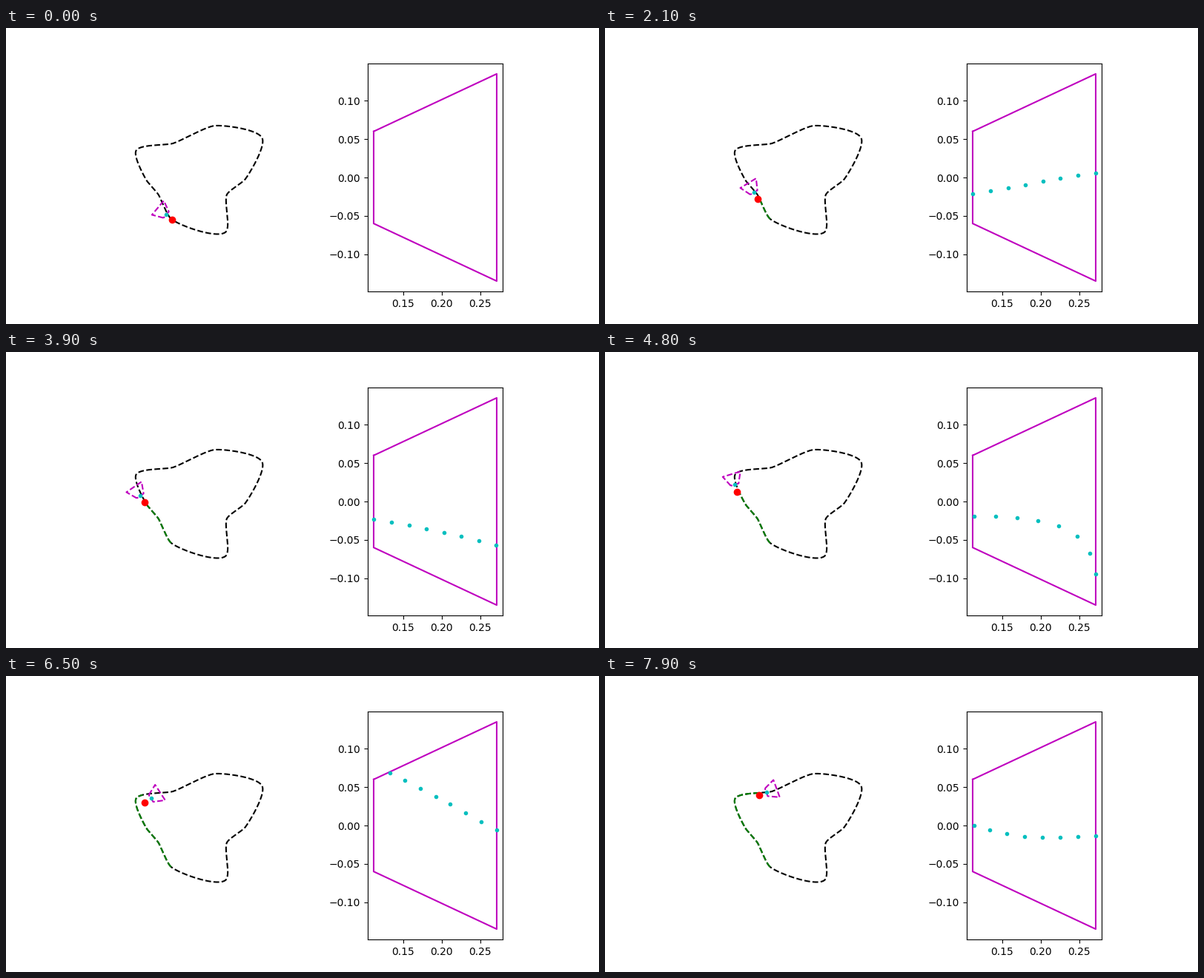
Animation, 800 px wide and 400 px high, one loop 8000 ms. Source, as a matplotlib script:

```python
import numpy as np
import matplotlib.pyplot as plt
from matplotlib.animation import FuncAnimation

W, H, DPI = 800, 400, 100
FRAMES, INTERVAL = 80, 100
SCALE = 92                      # pixels per metre on the map
NEAR, FAR = 0.1115, 0.2715      # camera view, metres ahead of the robot
HALF_NEAR, HALF_FAR = 0.06, 0.135

CORNERS = np.array([
    (223, 258.2), (205.5, 225), (189, 205), (175.6, 165.5), (225, 156),
    (282, 132), (345.5, 148.5), (323, 204), (298, 225), (296, 276)])

# time (s), x, y, heading (degrees)
POSES = np.array([
    (0.0, 224.0, 259.0, 140), (0.35, 222.2, 256.8, 133),
    (0.7, 219.8, 252.8, 122), (1.4, 213.1, 241.9, 120.5),
    (2.1, 206.2, 231.0, 121.4), (2.6, 201.3, 223.3, 125),
    (3.0, 197.0, 217.0, 125), (3.7, 189.3, 206.2, 124.5),
    (4.4, 181.2, 194.6, 122), (4.8, 178.0, 189.0, 107),
    (5.1, 177.5, 185.4, 85), (5.45, 178.8, 180.8, 63),
    (5.95, 182.2, 175.9, 50), (6.5, 187.0, 171.0, 33),
    (7.2, 197.0, 165.2, 24), (7.9, 208.0, 160.7, 20)])


def smooth_loop(pts, rad=0.2, count=100):
    """Closed Bezier curve whose tangent at each corner halves the turn."""
    step = np.roll(pts, -1, axis=0) - pts
    ang = np.arctan2(step[:, 1], step[:, 0])
    turn = (ang - np.roll(ang, 1) + np.pi) % (2 * np.pi) - np.pi
    mid = ang - turn / 2
    tangent = np.column_stack([np.cos(mid), np.sin(mid)])
    t = np.linspace(0, 1, count)[:, None]
    parts = []
    for i, p in enumerate(pts):
        j = (i + 1) % len(pts)
        q, r = pts[j], rad * np.hypot(*step[i])
        a, b = p + r * tangent[i], q - r * tangent[j]
        parts.append((1 - t)**3 * p + 3 * t * (1 - t)**2 * a
                     + 3 * t**2 * (1 - t) * b + t**3 * q)
    return np.concatenate(parts)


def resample(curve, count):
    dist = np.r_[0, np.cumsum(np.hypot(*np.diff(curve, axis=0).T))]
    s = np.linspace(0, dist[-1], count)
    return np.column_stack([np.interp(s, dist, c) for c in curve.T])


def hermite(t, keys, vals, slopes):
    i = int(np.clip(np.searchsorted(keys, t, side="right") - 1,
                    0, len(keys) - 2))
    h = keys[i + 1] - keys[i]
    u = (t - keys[i]) / h
    return ((2*u**3 - 3*u**2 + 1) * vals[i] + (u**3 - 2*u**2 + u) * h * slopes[i]
            + (3*u**2 - 2*u**3) * vals[i + 1] + (u**3 - u**2) * h * slopes[i + 1])


TIMES, VALS = POSES[:, 0], POSES[:, 1:]
SLOPES = np.gradient(VALS, TIMES, axis=0)
TRACK = resample(smooth_loop(CORNERS), 2400)
VIEW = np.array([(NEAR, HALF_NEAR), (FAR, HALF_FAR), (FAR, -HALF_FAR),
                 (NEAR, -HALF_NEAR), (NEAR, HALF_NEAR)])


def pose(t):
    x, y, deg = hermite(t, TIMES, VALS, SLOPES)
    a = np.radians(deg)
    axes = np.array([(np.cos(a), -np.sin(a)), (-np.sin(a), -np.cos(a))])
    return np.array([x, y]), axes


def seen_points(pos, axes, start, count=8):
    ahead = TRACK[start:start + 300]
    fwd, side = ((ahead - pos) @ axes.T / SCALE).T
    half = HALF_NEAR + (fwd - NEAR) / (FAR - NEAR) * (HALF_FAR - HALF_NEAR)
    idx = np.flatnonzero((fwd >= NEAR) & (fwd <= FAR) & (abs(side) <= half))
    if not len(idx):
        return [], []
    pick = idx[np.linspace(0, len(idx) - 1, count).astype(int)]
    return fwd[pick], side[pick]


fig = plt.figure(figsize=(W / DPI, H / DPI), dpi=DPI, facecolor="white")

world = fig.add_axes([0, 0, 1, 1])
world.set(xlim=(0, W), ylim=(H, 0))
world.axis("off")
world.plot(*TRACK.T, "k--")
trail, = world.plot([], [], "g--")
view, = world.plot([], [], "m--")
robot, = world.plot([], [], "ro")
probe, = world.plot([], [], "c.")

camera = fig.add_axes([487.7 / W, 0.11, 182.6 / W, 0.77])
camera.set(xlim=(0.1035, 0.2795), ylim=(-0.1485, 0.1485),
           xticks=[0.15, 0.2, 0.25], yticks=[-0.1, -0.05, 0, 0.05, 0.1])
camera.xaxis.set_major_formatter("{x:.2f}")
camera.yaxis.set_major_formatter("{x:.2f}")
camera.plot(*VIEW.T, "m-")
dots, = camera.plot([], [], "c.")


def update(i):
    pos, axes = pose(i * INTERVAL / 1000)
    near = int(np.argmin(np.hypot(*(TRACK[:1200] - pos).T)))
    trail.set_data(*TRACK[:near + 1].T)
    view.set_data(*(pos + SCALE * VIEW @ axes).T)
    robot.set_data([pos[0]], [pos[1]])
    tip = pos + SCALE * NEAR * axes[0]
    probe.set_data([tip[0]], [tip[1]])
    dots.set_data(*(seen_points(pos, axes, near) if i else ([], [])))
    return trail, view, robot, probe, dots


anim = FuncAnimation(fig, update, frames=FRAMES, interval=INTERVAL,
                     repeat=True, repeat_delay=0, blit=False)
plt.show()
```
